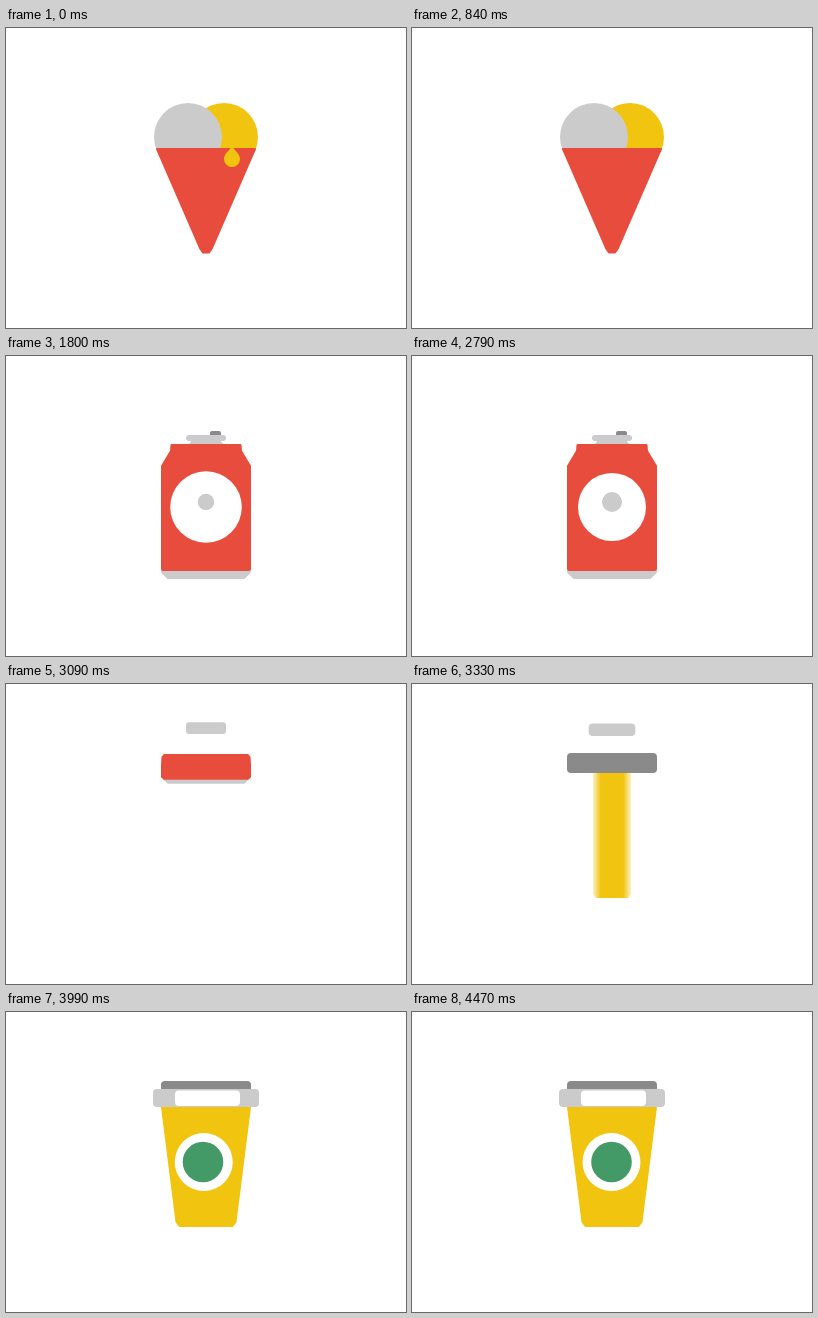
Animation of 400x300 px, one loop 4.5 s. Source, as an HTML page with a canvas:

```html
<!DOCTYPE html>
<html lang="en">
<head>
<meta charset="utf-8">
<title>Ice cream, can, cup</title>
<style>
  html, body { margin: 0; width: 100%; height: 100%; overflow: hidden; background: #fff; }
  canvas { display: block; width: 100vw; height: 100vh; }
</style>
</head>
<body>
<canvas width="400" height="300"></canvas>
<script>
const ctx = document.querySelector('canvas').getContext('2d');
const LOOP = 4500;
const RED = '#e84c3d', YELLOW = '#f1c40f', LIGHT = '#cbcbcb', DARK = '#8a8a8a', GREEN = '#439a66';

const linear = p => p;
const easeIn = p => p * p;
const easeOut = p => 1 - (1 - p) ** 3;
const easeInOut = p => p * p * (3 - 2 * p);
const backOut = s => p => 1 + (s + 1) * (p - 1) ** 3 + s * (p - 1) ** 2;
const mix = (a, b, p) => a + (b - a) * p;
const mixPoints = (a, b, p) => a.map(([x, y], i) => [mix(x, b[i][0], p), mix(y, b[i][1], p)]);
const phase = (t, start, end, ease = linear) =>
  ease(Math.min(1, Math.max(0, (t - start) / (end - start))));

// Right halves of the body outlines, top to bottom: [distance from centre, y]
const mirror = half => [...half, ...half.slice().reverse().map(([x, y]) => [-x, y])]
  .map(([x, y]) => [200 + x, y]);
const CONE = mirror([[49, 121], [42, 137], [32, 160], [5.5, 221], [3, 224.5]]);
const CAN = mirror([[34.5, 89], [35, 95], [44, 110], [44, 213], [43, 214]]);
const RAISED_CAN = mirror([[34.5, 75], [35, 80], [44, 95], [44, 185], [43, 186]]);
const LID = mirror([[42, 70], [44, 72], [44, 79], [44, 86], [42, 88]]);
const CAN_BASE = [[156, 212], [244, 212], [244, 216], [238, 222], [162, 222], [156, 216]];

function shape(points, color, border = 2) {
  ctx.beginPath();
  points.forEach(([x, y]) => ctx.lineTo(x, y));
  ctx.closePath();
  ctx.fillStyle = ctx.strokeStyle = color;
  ctx.lineJoin = 'round';
  ctx.lineWidth = border;
  ctx.fill();
  if (border) ctx.stroke();
}

function disc(x, y, r, color) {
  ctx.beginPath();
  ctx.arc(x, y, Math.max(0, r), 0, 7);
  ctx.fillStyle = color;
  ctx.fill();
}

// Horizontally centred on x
function pill(x, y, w, h, r, color) {
  ctx.beginPath();
  ctx.roundRect(x - w / 2, y, w, h, r);
  ctx.fillStyle = color;
  ctx.fill();
}

function drip(y) {
  ctx.beginPath();
  ctx.moveTo(226, y - 14);
  ctx.bezierCurveTo(228, y - 8, 234, y - 6, 234, y);
  ctx.arc(226, y, 8, 0, Math.PI);
  ctx.bezierCurveTo(218, y - 6, 224, y - 8, 226, y - 14);
  ctx.fillStyle = YELLOW;
  ctx.fill();
}

function iceCream(t) {
  const fly = phase(t, 960, 1200, easeIn);
  const y = mix(109, -40, fly);
  disc(mix(218, 259, fly), y, 34, YELLOW);
  disc(mix(182, 165, fly), y, 34, LIGHT);
  shape(mixPoints(CONE, RAISED_CAN, phase(t, 960, 1200, easeInOut)), RED);
  if (t < 830) drip(mix(131, 316, phase(t, 450, 820, easeIn)));
}

function can(t) {
  const drop = phase(t, 1230, 1470, backOut(1.2));
  const collapse = phase(t, 2850, 3130, easeInOut);
  const lift = phase(t, 2800, 3150, easeInOut);
  const baseShift = mix(mix(-35, 0, drop), -130, collapse);

  if (t > 1500 && t < 3210) {
    const rise = phase(t, 1530, 1800, backOut(5));
    const y = mix(mix(93, 79, rise), 35, lift);
    const tab = 1 - phase(t, 2800, 2900);
    if (tab) pill(209.5, y - 4 * tab, 11 * tab, 6, 2, DARK);
    pill(200, y, 40, mix(6, 12, lift), 3, LIGHT);
    if (lift < 0.1) shape([[186, y + 5], [214, y + 5], [217, y + 9], [183, y + 9]], LIGHT, 0);
  }

  if (collapse < 1) shape(CAN_BASE.map(([x, y]) => [x, y + baseShift]), LIGHT);
  const body = mixPoints(mixPoints(RAISED_CAN, CAN, drop), LID, collapse);
  shape(body, collapse > 0.97 ? DARK : RED);

  const shrink = 1 - phase(t, 2800, 2960, easeIn);
  disc(200, 151, 34 * phase(t, 1590, 1860, backOut(1.7)) * shrink, '#fff');
  disc(200, 146, 10 * phase(t, 1740, 1980, backOut(1.7)) * shrink, LIGHT);
}

function cup(t) {
  const pour = phase(t, 3190, 3310, easeIn);
  const widen = phase(t, 3330, 3510, easeInOut);
  const top = mix(19, 44, widen), bottom = mix(19, 29.5, widen);
  const end = mix(86, 213, pour);

  // The stream has soft sides that sharpen as it becomes the cup
  const soft = 0.22 * (1 - widen);
  let fill = YELLOW;
  if (soft) {
    fill = ctx.createLinearGradient(199 - top, 0, 201 + top, 0);
    fill.addColorStop(0, 'rgba(241,196,15,.15)');
    fill.addColorStop(soft, YELLOW);
    fill.addColorStop(1 - soft, YELLOW);
    fill.addColorStop(1, 'rgba(241,196,15,.15)');
  }
  const side = [[200 - top, 88], [200 + top, 88], [200 + top, 95],
    [200 + bottom, end - 3], [200 + bottom - 3, end + 1],
    [200 - bottom + 3, end + 1], [200 - bottom, end - 3], [200 - top, 95]];
  shape(side, fill, soft ? 0 : 2);

  const slide = phase(t, 3690, 4170, p => 1 - (1 - p) ** 4);
  if (t > 3690) {
    ctx.save();
    ctx.beginPath();
    [[155, 95], [245, 95], [231, 215], [169, 215]].forEach(([x, y]) => ctx.lineTo(x, y));
    ctx.clip();
    disc(mix(110, 199.5, slide), 150, 29, '#fff');
    disc(mix(70, 199.5, slide), 150, 20.3, GREEN);
    ctx.restore();
  }

  pill(200, 69, 90, 20, 4, DARK);
  const fall = phase(t, 3270, 3510, easeIn);
  const spread = phase(t, 3480, 3690, easeOut);
  pill(200, mix(37, 77, fall), mix(mix(46, 56, fall), 106, spread), mix(12, 18, fall), 4, LIGHT);
  if (spread > 0) pill(201.5, 78.5, 65 * spread, 15.5, 4, '#fff');
}

function draw(now) {
  const t = now % LOOP;
  ctx.fillStyle = '#fff';
  ctx.fillRect(0, 0, 400, 300);
  if (t < 1215) iceCream(t);
  else if (t < 3190) can(t);
  else cup(t);
}

const start = performance.now();
function tick() {
  draw(performance.now() - start);
  requestAnimationFrame(tick);
}
tick();
</script>
</body>
</html>
```
